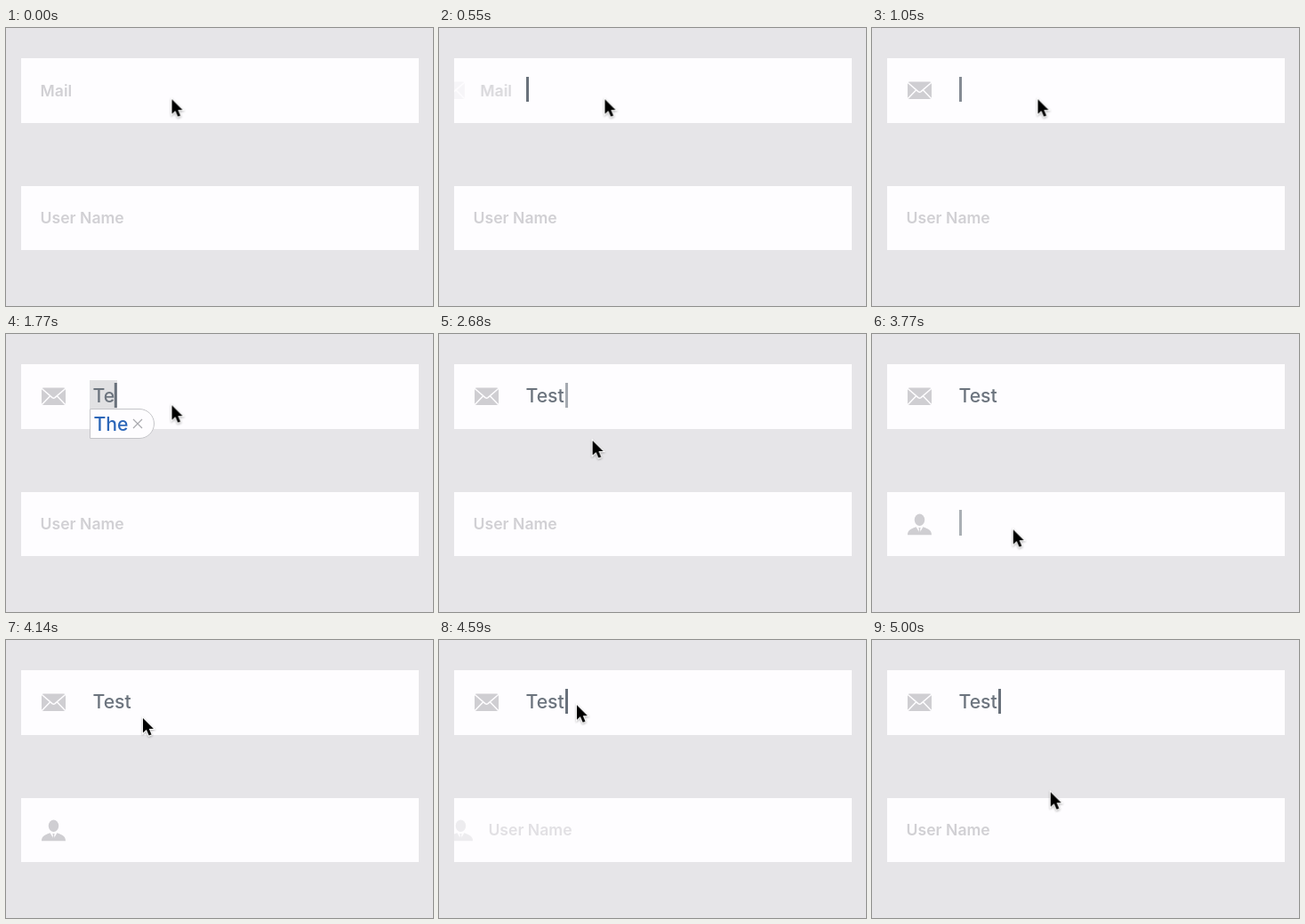
These frames come from a looping animation (480 px wide and 313 px high, 5050 ms). An HTML page:

```html
<!DOCTYPE html>
<html lang="en">
<head>
<meta charset="utf-8">
<title>Form fields</title>
<style>
  html, body { margin: 0; width: 100%; height: 100%; overflow: hidden; }
  body { background: #e6e5e8; font-family: Inter, Roboto, sans-serif; }
  div, svg { position: absolute; }
  div, svg, .anim { animation: 5050ms ease-in-out infinite; }
  svg { overflow: visible; }

  .field { left: 17px; width: 447px; height: 72.5px; background: #fefdff; overflow: hidden; }
  .mail { top: 34px; }
  .user { top: 177.5px; }

  .hint { left: 21.6px; top: 21.6px; font: 600 17.6px/30px Inter, Roboto, sans-serif; color: #d1d0d4; white-space: nowrap; }
  .icon { left: 23px; top: 24px; width: 27px; height: 25px; fill: #cfced2; }
  .mail .hint { animation-name: mail-hint; }
  .mail .icon { animation-name: mail-icon; }
  .user .hint { animation-name: user-hint; }
  .user .icon { animation-name: user-icon; }

  .typed { left: 97.5px; top: 54.4px; height: 30px; overflow: hidden; white-space: nowrap;
    font: 500 21.2px/30px Inter, Roboto, sans-serif; color: #6c747e;
    animation-name: type; animation-timing-function: step-end; }

  .caret { left: 98px; width: 2.5px; height: 28.5px; background: #69717b; animation-timing-function: linear; }
  .c1 { top: 54.6px; animation-name: caret-mail; }
  .c2 { top: 198.2px; animation-name: caret-user; }
  .shift { left: 0; top: 0; animation-name: shift; animation-timing-function: step-end; }

  .mark { left: 94px; top: 52px; width: 31px; height: 32px; background: #e1e1e3; }
  .tip { left: 94px; top: 83.5px; width: 71px; height: 32px; background: #fefdff;
    border: 1px solid #c4c4c8; border-radius: 0 17px 17px 0; }
  .tip b { position: absolute; left: 3.5px; top: 1px; font: 500 21.2px/30px Inter, Roboto, sans-serif; color: #2b66b8; }
  .tip svg { left: 48px; top: 11px; width: 10px; height: 10px; stroke: #a9a9ae; stroke-width: 1.2; }
  .mark, .tip { animation-name: suggest; animation-timing-function: linear; }

  .pointer { left: 0; top: 0; width: 14px; height: 22px; animation-name: point;
    filter: drop-shadow(0 1.5px 1px rgba(0, 0, 0, .3)); }

  /* Hints leave to the right, icons come in from the left */
  @keyframes mail-hint {
    0%, 9.505% { transform: none; opacity: 1; }
    14.455%, 100% { transform: translateX(46px); opacity: 0; }
  }
  @keyframes mail-icon {
    0%, 9.505% { transform: translateX(-46px); opacity: 0; }
    14.455%, 100% { transform: none; opacity: 1; }
  }
  @keyframes user-hint {
    0%, 65.35%, 93.66%, 100% { transform: none; opacity: 1; }
    70.3%, 87.13% { transform: translateX(46px); opacity: 0; }
  }
  @keyframes user-icon {
    0%, 65.35%, 93.66%, 100% { transform: translateX(-46px); opacity: 0; }
    70.3%, 87.13% { transform: none; opacity: 1; }
  }

  @keyframes type {
    0% { width: 0; }
    27.92% { width: 13px; }
    31.485% { width: 25px; }
    37.82% { width: 35.5px; }
    41.386%, 100% { width: 60px; }
  }
  @keyframes shift {
    0% { transform: none; }
    27.92% { transform: translateX(12.5px); }
    31.485% { transform: translateX(23.8px); }
    37.82% { transform: translateX(34.8px); }
    41.386%, 100% { transform: translateX(43.5px); }
  }
  @keyframes caret-mail {
    0%, 9.9% { opacity: 0; }
    9.901%, 20.2% { opacity: 1; }
    23.366%, 27.92% { opacity: 0; }
    27.921%, 51.88% { opacity: 1; }
    54.85%, 56.83% { opacity: 0; }
    59.41%, 62.97% { opacity: 1; }
    62.971%, 86.336% { opacity: 0; }
    86.337%, 100% { opacity: 1; }
  }
  @keyframes caret-user {
    0%, 62.97% { opacity: 0; }
    62.971%, 73.27% { opacity: 1; }
    76.44%, 82.18% { opacity: 0; }
    83.76%, 86.336% { opacity: 1; }
    86.337%, 100% { opacity: 0; }
  }
  @keyframes suggest {
    0%, 35.04% { opacity: 0; }
    35.041%, 37.82% { opacity: 1; }
    39.6%, 100% { opacity: 0; }
  }
  @keyframes point {
    0%, 50.89% { transform: translate(186.5px, 80.2px); animation-timing-function: ease-in; }
    53.07% { transform: translate(172.7px, 119.2px); animation-timing-function: cubic-bezier(.2, .5, .5, 1); }
    59.41%, 74.85% { transform: translate(158.7px, 220.2px); }
    81.98% { transform: translate(153.9px, 88.2px); animation-timing-function: ease-out; }
    83.76%, 96.44% { transform: translate(154.9px, 73.2px); animation-timing-function: ease-in; }
    99.01%, 100% { transform: translate(200.7px, 171.2px); }
  }
</style>
</head>
<body>
  <div class="field mail">
    <div class="hint">Mail</div>
    <svg class="icon" viewBox="0 0 27 25">
      <rect y="2.5" width="27" height="19.5" rx="2"/>
      <path d="M0 3.2L12 13.6Q13.5 14.8 15 13.6L27 3.2M.3 21.5L9.7 11.7M26.7 21.5L17.3 11.7" fill="none" stroke="#fefdff" stroke-width="1.5"/>
    </svg>
  </div>

  <div class="field user">
    <div class="hint">User Name</div>
    <svg class="icon" viewBox="0 0 27 25">
      <ellipse cx="13.5" cy="7.2" rx="5.7" ry="6.7"/>
      <path d="M0 24.3C0 19 3 17.6 9.6 15.3L13.5 22L17.4 15.3C24 17.6 27 19 27 24.3Z"/>
      <path d="M12.3 16H14.7L14.1 18L15 22.5H12L12.9 18Z"/>
    </svg>
  </div>

  <div class="mark"></div>
  <div class="typed">Test</div>
  <div class="tip">
    <b>The</b>
    <svg viewBox="0 0 10 10"><path d="M0 0L10 10M10 0L0 10"/></svg>
  </div>
  <div class="shift"><div class="caret c1"></div></div>
  <div class="caret c2"></div>

  <svg class="pointer" viewBox="0 0 14 22">
    <path d="M0 0V16.6L3.9 13L6.7 19.6L9.6 18.4L6.8 11.9H12Z" stroke="#fff" stroke-width="2" paint-order="stroke"/>
  </svg>
</body>
</html>
```
